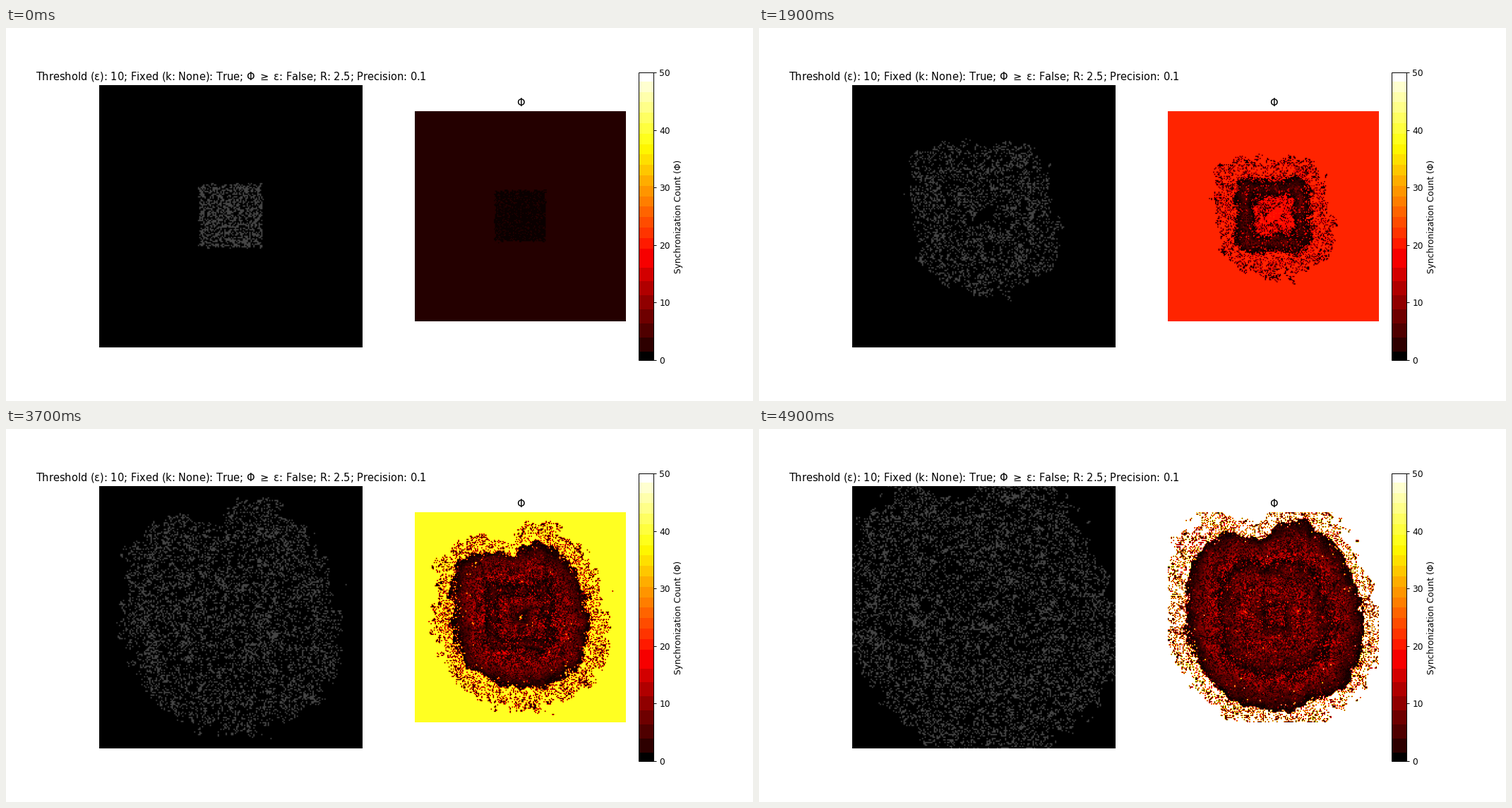
These frames come from a looping animation (1058x529 px, 5 s). A matplotlib script:

```python
import numpy as np
import matplotlib.pyplot as plt
from matplotlib.animation import FuncAnimation
from matplotlib.cm import ScalarMappable
from matplotlib.colors import BoundaryNorm, ListedColormap

N = 200          # cells per side
FRAMES = 50
LAG = 11         # frames between first sparks and the dense front
PULSE = 20       # frames between waves behind the front
GRAY = 0.27

rng = np.random.default_rng(4)


def smooth_noise(passes):
    """Blurred noise with unit deviation."""
    z = rng.standard_normal((N, N))
    for _ in range(passes):
        for axis in (0, 1):
            z = (np.roll(z, 1, axis) + z + np.roll(z, -1, axis)) / 3
    return z / z.std()


def arrival_times():
    """Time at which the dense front reaches each cell."""
    c = np.arange(N) - (N - 1) / 2
    x, y = np.meshgrid(c, -c)
    r = np.hypot(x, y)
    u = (np.abs(x) ** 8 + np.abs(y) ** 8) ** (1 / 8)
    angle = np.degrees(np.arctan2(y, x))
    knots = [0, 15, 25, 35, 45, 60, 75, 85, 100, 110, 125, 140, 155, 165,
             180, 195, 210, 225, 240, 255, 270, 285, 300, 315, 330, 345]
    radii = [74, 72, 69, 73, 78, 80, 81, 75, 64, 74, 84, 83, 78, 75,
             70, 72, 72, 75, 75, 75, 76, 76, 77, 79, 78, 76]
    reach = np.interp(angle, knots, radii, period=360)
    start = 28.5 * r / u
    outward = 13 + 28 * (r - start) / (reach - start)
    inward = 11 + (25.5 - u) / 0.96
    return np.maximum(outward, inward), np.maximum(np.abs(x), np.abs(y))


def simulate():
    arrival, square = arrival_times()
    arrival = arrival + 1.3 * smooth_noise(18) + 0.4 * smooth_noise(3)
    lag = LAG + 1.8 * smooth_noise(7)
    clump = smooth_noise(2)
    patch = np.exp(0.35 * smooth_noise(4))
    spark = rng.random((N, N)) < 0.31 + 0.1 * clump
    block = square < 23.8 + 0.7 * smooth_noise(1)

    phi = np.full((N, N), 2.0)
    states = []
    for t in range(FRAMES):
        age = t - arrival
        dense = age >= 0
        fringe = (age > -lag) & ~dense & spark
        phase = age % PULSE
        drift = np.roll(clump, (7 * t, 11 * t), (0, 1))

        p_on = np.where(dense, 0.21 + 0.09 * drift + 0.03 * drift ** 2, 0)
        p_on[dense & (phase < 2.5)] += 0.16
        p_on[fringe] = 0.78
        # Resets grow likelier with the count, so few cells lag behind.
        p_zero = dense * patch * (0.02 + 0.01 * phi)
        p_zero[dense & (phase < 3)] += 0.28
        p_zero[fringe] = 0.1
        entering = fringe & (age - 1 <= -lag)
        p_zero[entering] = 1

        if t < 8:
            p_on = np.where(block, np.maximum(p_on, 0.47 * (1 - t / 8)), p_on)
        if t == 0:
            p_zero = np.where(block, 0.82, 0)
            p_on = np.where(block, 0.47, 0)
        else:
            phi = phi + 1
        on = rng.random((N, N)) < p_on
        phi = np.where(rng.random((N, N)) < p_zero, 0, phi)
        states.append((GRAY * on, phi))
    return states


states = simulate()

fig, (left, right) = plt.subplots(1, 2, figsize=(12, 6), dpi=1058 / 12)
cells = left.imshow(states[0][0], cmap="gray", vmin=0, vmax=1)
counts = right.imshow(states[0][1], cmap="hot", vmin=0, vmax=50)
left.set_title("Threshold (ε): 10; Fixed (k: None): True; "
               r"Φ $\geq$ ε: False; R: 2.5; Precision: 0.1", size=11.96)
right.set_title("Φ")
for ax in (left, right):
    ax.axis("off")

# Colour bar in uneven steps
edges = np.r_[0, np.linspace(1.5, 16.1, 7), np.linspace(19.4, 48.5, 17), 50]
mid = (edges[:-1] + edges[1:]) / 2
mid[0], mid[-1] = 0, 50
bands = ListedColormap(plt.get_cmap("hot")(mid / 50))
bands.colors[0] = (0, 0, 0, 1)
bar = fig.colorbar(ScalarMappable(BoundaryNorm(edges, len(mid)), bands),
                   ax=right, spacing="proportional",
                   ticks=range(0, 51, 10), label="Synchronization Count (Φ)")
bar.ax.minorticks_off()


def update(i):
    on, phi = states[i]
    cells.set_data(on)
    counts.set_data(phi)
    return cells, counts


anim = FuncAnimation(fig, update, frames=FRAMES, interval=100,
                     repeat=True, repeat_delay=0)
plt.show()
```
